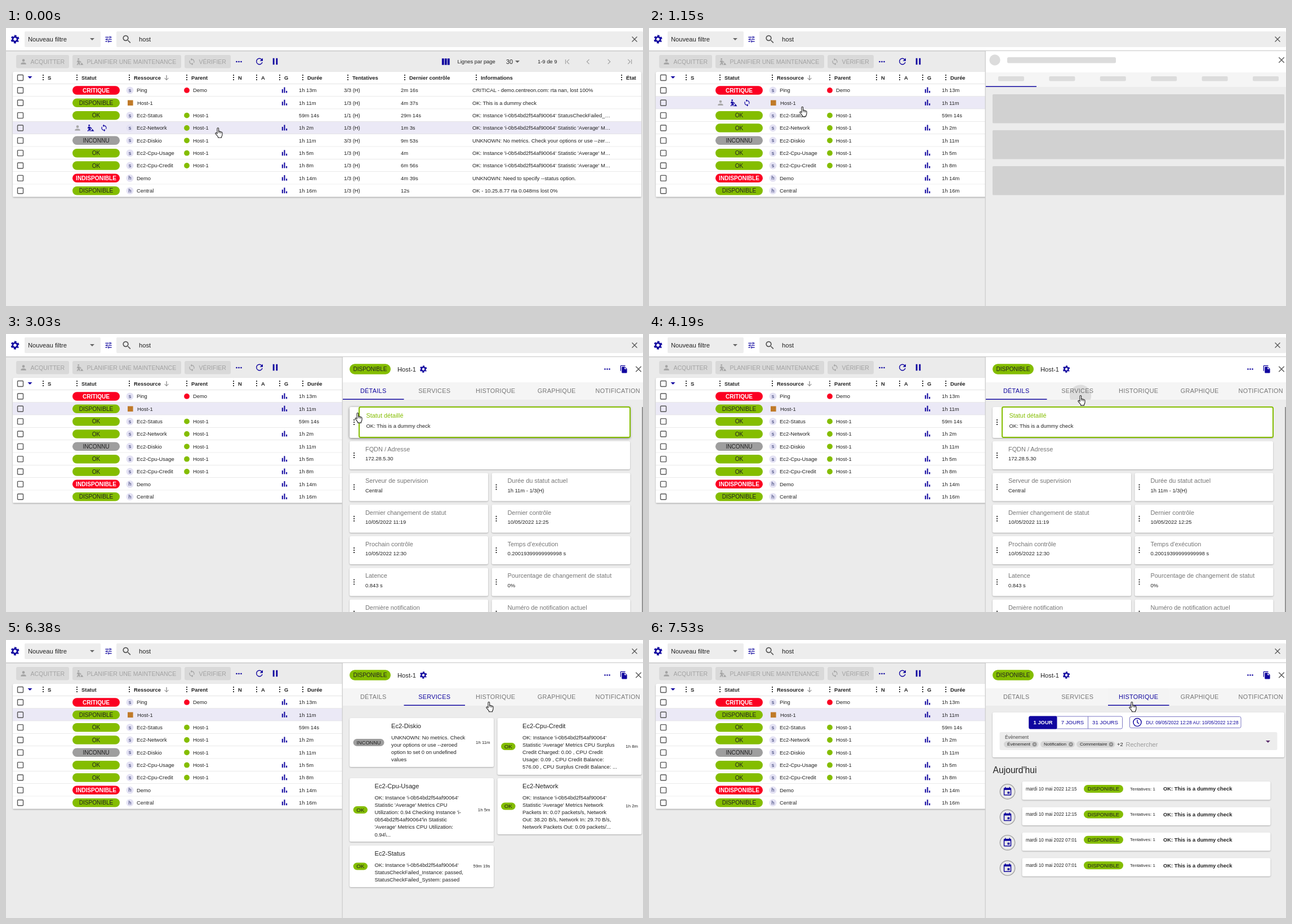
Animation of 1131 by 495 pixels, one loop 8 s. Source, as an HTML page:

```html
<!DOCTYPE html>
<html lang="fr">
<head>
<meta charset="utf-8">
<title>Ressources</title>
<style>
html, body { margin: 0; height: 100%; overflow: hidden; background: #ebebeb; }
svg { display: block; width: 100vw; height: 100vh; }
text { font-family: "Liberation Sans", Arial, sans-serif; white-space: pre; }
.tab { letter-spacing: .3px; }
.card { fill: #fff; filter: drop-shadow(0 1px 1px rgba(0, 0, 0, .28)); }
.card.raised { filter: drop-shadow(0 1px 2px rgba(0, 0, 0, .5)); }
</style>
</head>
<body>
<svg id="stage" viewBox="0 0 1131 495" xmlns="http://www.w3.org/2000/svg"></svg>
<script>
const BLUE = '#10069f', GREEN = '#84bd00', RED = '#fb0022', GREY = '#9e9e9e', INK = '#222', SOFT = '#757575';

// Drawing helpers; text is placed by its vertical centre.
const text = (x, y, s, size = 9.4, fill = INK, more = '') =>
  `<text x="${x}" y="${(y + size * .36).toFixed(2)}" font-size="${size}" fill="${fill}" ${more}>${s}</text>`;
const bold = (x, y, s, size = 9.4, fill = INK, more = '') => text(x, y, s, size, fill, 'font-weight="700" ' + more);
const MID = 'text-anchor="middle"', END = 'text-anchor="end"';
const rect = (x, y, w, h, fill, r = 0, more = '') =>
  `<rect x="${x}" y="${y}" width="${w}" height="${h}" rx="${r}" fill="${fill}" ${more}/>`;
const disc = (x, y, r, fill, more = '') => `<circle cx="${x}" cy="${y}" r="${r}" fill="${fill}" ${more}/>`;
const card = (x, y, w, h, more = '') => `<rect class="card" x="${x}" y="${y}" width="${w}" height="${h}" rx="2.5" ${more}/>`;
const group = (id, body, more = '') => `<g id="${id}" ${more}>${body}</g>`;
const repeat = (n, f) => Array.from({ length: n }, (_, i) => f(i)).join('');
const chip = (x, y, w, h, label, size = 10, fill = GREEN, ink = INK) =>
  rect(x, y - h / 2, w, h, fill, h / 2) +
  text(x + w / 2, y, label, size, ink, MID + (ink === '#fff' ? ' font-weight="700"' : ''));
const grip = (x, y) => repeat(3, i => rect(x - 1, y - 5 + i * 4, 2, 2, INK, .6));
const dots = (x, y) => repeat(3, i => disc(x - 4 + i * 4, y, 1.3, BLUE));
const arrow = (x, y, fill = '#666') => `<path d="M${x - 4} ${y - 2}h8l-4 4z" fill="${fill}"/>`;

// Icons on a 24 x 24 grid
const line = (d, w = 2) => `<path d="${d}" fill="none" stroke="currentColor" stroke-width="${w}"/>`;
const solid = d => `<path d="${d}" fill="currentColor" fill-rule="evenodd"/>`;
const ICONS = {
  gear: `<g fill="none" stroke="currentColor" transform="rotate(30 12 12)"><circle cx="12" cy="12" r="5.5" stroke-width="3.8"/>
    <circle cx="12" cy="12" r="8.4" stroke-width="3.2" stroke-dasharray="4.8 4" stroke-dashoffset="2.4"/></g>`,
  tune: solid('M3 17v2h6v-2zM3 5v2h10V5zm10 16v-2h8v-2h-8v-2h-2v6zM7 9v2H3v2h4v2h2V9zm14 4v-2H11v2zm-6-4h2V7h4V5h-4V3h-2z'),
  search: line('M14.500 14.500L20 20M15 9.500a5.500 5.500 0 1 1-11 0a5.500 5.500 0 1 1 11 0', 2.1),
  close: line('M5.700 5.700L18.300 18.300M18.300 5.700L5.700 18.300', 1.8),
  person: solid('M12 12a4 4 0 1 0 0-8a4 4 0 0 0 0 8zm0 2c-2.700 0-8 1.300-8 4v2h16v-2c0-2.700-5.300-4-8-4z'),
  worker: disc(8, 4, 2.4, 'currentColor') + line('M7 8l-3 5M7 8l2 6l4 3M7 9l1 6l-4 7M9 14l2 8M9 9l7 5', 2.6) + solid('M13 22l5-7l5 7z'),
  sync: solid('M12 4V1L8 5l4 4V6a6 6 0 0 1 5.300 8.800l1.460 1.460A8 8 0 0 0 12 4zm0 14a6 6 0 0 1-5.300-8.800L5.240 7.740A8 8 0 0 0 12 20v3l4-4l-4-4z'),
  refresh: solid('M17.650 6.350A8 8 0 1 0 19.730 14h-2.080A6 6 0 1 1 12 6c1.660 0 3.140.69 4.220 1.780L13 11h7V4z'),
  pause: solid('M6 4h4v16H6zm8 0h4v16h-4z'),
  columns: solid('M2 4h5.500v16H2zm7 0h5.500v16H9zm7 0h5.500v16H16z'),
  bars: solid('M4 9h3.500v11H4zm6.200-6h3.500v17h-3.500zm6.300 11H20v6h-3.500z'),
  copy: solid('M16 1H4a2 2 0 0 0-2 2v14h2V3h12zm-1 4l6 6v10a2 2 0 0 1-2 2H8a2 2 0 0 1-2-2V7a2 2 0 0 1 2-2zm-1 7h5.500L14 6.500z'),
  event: solid('M17 12h-5v5h5zM16 1v2H8V1H6v2H5a2 2 0 0 0-2 2v14a2 2 0 0 0 2 2h14a2 2 0 0 0 2-2V5a2 2 0 0 0-2-2h-1V1zm3 18H5V8h14z'),
  clock: line('M12 6v6.500l4.500 3M22 12a10 10 0 1 1-20 0a10 10 0 1 1 20 0'),
  first: line('M17 5l-7 7l7 7M6 5v14'),
  prev: line('M15 5l-7 7l7 7'),
  next: line('M9 5l7 7l-7 7'),
  last: line('M7 5l7 7l-7 7M18 5v14'),
  down: line('M12 3v17M5 13l7 7l7-7')
};
const icon = (name, x, y, size, color = BLUE) =>
  `<g transform="translate(${x - size / 2} ${y - size / 2}) scale(${size / 24})" color="${color}">${ICONS[name]}</g>`;

const topBar = () =>
  rect(0, 0, 1131, 40, '#fff') + rect(0, 40, 1131, 1, '#c6c6c6') +
  icon('gear', 16, 20, 18) + rect(33, 6, 135, 28, '#ededed', 2) + text(39, 20, 'Nouveau filtre', 11.2) +
  arrow(153, 20) + icon('tune', 182, 20, 15) + rect(196, 6, 935, 28, '#ededed', 2) +
  icon('search', 214.5, 20, 19, '#555') + text(236, 20, 'host', 11.2) + icon('close', 1116, 20, 17, '#555');

const toolButton = (x, w, name, label) =>
  rect(x, 48, w, 23.500, '#d9d9d9', 3) + icon(name, x + 13, 60, 14, '#a3a3a3') + text(x + 25.500, 60, label, 10.5, '#a3a3a3');

const toolbar = () =>
  rect(0, 41, 1131, 1, '#dcdcdc') +
  toolButton(18, 94, 'person', 'ACQUITTER') + toolButton(118, 193, 'worker', 'PLANIFIER UNE MAINTENANCE') +
  toolButton(317, 82, 'sync', 'VÉRIFIER') + dots(413.5, 60) +
  icon('refresh', 450, 59.500, 18) + icon('pause', 478, 59.500, 17) + icon('columns', 781, 60, 17) +
  text(801.5, 60, 'Lignes par page') + text(888, 60, '30', 10.8) + arrow(908, 60) + text(944, 60, '1-9 de 9') +
  ['first', 'prev', 'next', 'last'].map((n, i) => icon(n, 997 + 36.700 * i, 60, 14, '#a0a0a0')).join('');

const ROW_H = 22.34, ROW_TOP = 99.8;
const INSTANCE = "OK: Instance 'i-0b54bd2f54af90064'", AVERAGE = INSTANCE + " Statistic 'Average' M…";
const STATUS = { OK: GREEN, DISPONIBLE: GREEN, INCONNU: GREY, CRITIQUE: RED, INDISPONIBLE: RED };
// status, kind, name, parent, graph, duration, tries, last check, information
const ROWS = [
  ['CRITIQUE', 's', 'Ping', 'Demo', 1, '1h 13m', '3/3 (H)', '2m 16s', 'CRITICAL - demo.centreon.com: rta nan, lost 100%'],
  ['DISPONIBLE', '', 'Host-1', '', 1, '1h 11m', '1/3 (H)', '4m 37s', 'OK: This is a dummy check'],
  ['OK', 's', 'Ec2-Status', 'Host-1', 0, '59m 14s', '1/1 (H)', '29m 14s', INSTANCE + ' StatusCheckFailed_…'],
  ['OK', 's', 'Ec2-Network', 'Host-1', 1, '1h 2m', '1/3 (H)', '1m 3s', AVERAGE],
  ['INCONNU', 's', 'Ec2-Diskio', 'Host-1', 0, '1h 11m', '3/3 (H)', '9m 53s', 'UNKNOWN: No metrics. Check your options or use --zer…'],
  ['OK', 's', 'Ec2-Cpu-Usage', 'Host-1', 1, '1h 5m', '1/3 (H)', '4m', AVERAGE],
  ['OK', 's', 'Ec2-Cpu-Credit', 'Host-1', 1, '1h 8m', '1/3 (H)', '6m 56s', AVERAGE],
  ['INDISPONIBLE', 'h', 'Demo', '', 1, '1h 14m', '1/3 (H)', '4m 39s', 'UNKNOWN: Need to specify --status option.'],
  ['DISPONIBLE', 'h', 'Central', '', 1, '1h 16m', '1/3 (H)', '12s', 'OK - 10.25.8.77 rta 0.048ms lost 0%']
];
const COLUMNS = [[66, 'S'], [126, 'Statut'], [219, 'Ressource'], [321, 'Parent'], [404, 'N'], [445, 'A'], [486, 'G'],
  [527, 'Durée'], [607, 'Tentatives'], [708, 'Dernier contrôle'], [835, 'Informations'], [1093, 'État']];

const checkbox = y => rect(20.500, y - 5, 10, 10, 'none', 1.2, 'stroke="#555" stroke-width="1.4"');

function tableRow([status, kind, name, parent, graph, time, tries, last, info], i) {
  const y = ROW_TOP + ROW_H * (i + .5), color = STATUS[status];
  return rect(12, y - ROW_H / 2, 1116, ROW_H, '#fff', 0, `id="bg${i}"`) +
    rect(12, y + ROW_H / 2 - .8, 1116, .8, '#dedede') + checkbox(y) +
    group('chip' + i, chip(118, y, 84, 15.5, status, 10.1, color, color === RED ? '#fff' : INK)) +
    group('acts' + i, icon('person', 127, y, 14, '#a8a8a8') + icon('worker', 150, y, 14) + icon('sync', 174, y, 14)) +
    (kind ? disc(220, y, 6.5, '#e3e1f3') + text(220, y - .3, kind, 9, '#222a66', MID) : rect(216, y - 4.800, 9.600, 9.600, '#c07a28')) +
    text(kind ? 232 : 233, y, name) +
    (parent ? disc(321, y, 4.9, parent === 'Demo' ? RED : GREEN) + text(332, y, parent) : '') +
    (graph ? icon('bars', 494.5, y - .2, 14) : '') +
    text(520, y, time) + text(600, y, tries) + text(701, y, last) + text(828, y, info);
}

const table = () =>
  card(12, 78, 1116, 223) + checkbox(88.500) + arrow(42.5, 88, BLUE) +
  COLUMNS.map(([x, s]) => grip(x, 88) + bold(x + 8, 88.500, s)).join('') + icon('down', 285, 88.500, 12, '#666') +
  rect(12, 99, 1116, .8, '#d4d4d4') + ROWS.map(tableRow).join('');

const skeleton = () =>
  rect(598, 41, 533, 38, '#fff') + rect(598, 79, 533, 26, '#f5f5f5') + disc(614, 57, 9.7, '#dcdcdc') +
  rect(636, 52, 193, 10.500, '#dcdcdc', 2.5) + icon('close', 1123, 57, 18, '#555') +
  repeat(6, i => rect(620 + 90.400 * i, 86, 46, 8.500, '#dcdcdc', 2)) +
  repeat(3, i => rect(610, 118 + 64 * i, 518, 51.500, '#d1d1d1', 1.5));

const TABS = ['DÉTAILS', 'SERVICES', 'HISTORIQUE', 'GRAPHIQUE', 'NOTIFICATION'];
const TAB_W = 108.5;
const header = () =>
  rect(598, 41, 533, 45, '#fff') + rect(598, 86, 533, 31, '#f5f5f5') +
  chip(610, 62.500, 73, 18.500, 'DISPONIBLE') + text(695, 62.500, 'Host-1', 11.2) + icon('gear', 741, 62.500, 15) +
  dots(1067.5, 62.500) + icon('copy', 1097, 62.500, 15) + icon('close', 1123, 62.500, 18, '#555') +
  TABS.map((s, i) => text(652.2 + TAB_W * i, 101, s, 10.85, SOFT, `${MID} class="tab" id="tab${i}"`)).join('');

const field = (x, y, w, label, value) =>
  card(x, y, w, 50) + grip(x + 8, y + 25) + text(x + 28, y + 14, label, 10.9, SOFT) + text(x + 28, y + 31, value);
const FIELDS = [
  ['Serveur de supervision', 'Central'], ['Durée du statut actuel', '1h 11m - 1/3(H)'],
  ['Dernier changement de statut', '10/05/2022 11:19'], ['Dernier contrôle', '10/05/2022 12:25'],
  ['Prochain contrôle', '10/05/2022 12:30'], ["Temps d'exécution", '0.20019399999999998 s'],
  ['Latence', '0.843 s'], ['Pourcentage de changement de statut', '0%'],
  ['Dernière notification', ''], ['Numéro de notification actuel', '']
];
const details = () =>
  card(610, 130, 498, 55, 'id="statusCard"') + grip(618, 157) +
  rect(627, 130, 481, 54, '#fff', 2.5, `stroke="${GREEN}" stroke-width="2"`) +
  text(639.5, 145, 'Statut détaillé', 10.9, GREEN) + text(639.5, 164, 'OK: This is a dummy check') +
  field(610, 191, 498, 'FQDN / Adresse', '172.28.5.30') +
  FIELDS.map(([a, b], i) => field(i % 2 ? 862.5 : 610, 247.5 + 56.300 * (i >> 1), 246, a, b)).join('') +
  rect(1129, 130, 2, 365, '#949494');

// x, y, height, title, status, duration, lines
const SERVICES = [
  [610, 139, 87, 'Ec2-Diskio', 'INCONNU', '1h 11m',
    ['UNKNOWN: No metrics. Check', 'your options or use --zeroed', 'option to set 0 on undefined', 'values']],
  [872.5, 139, 101, 'Ec2-Cpu-Credit', 'OK', '1h 8m',
    [INSTANCE, "Statistic 'Average' Metrics CPU Surplus", 'Credit Charged: 0.00 , CPU Credit', 'Usage: 0.09 , CPU Credit Balance:', '576.00 , CPU Surplus Credit Balance: ...']],
  [610, 246, 113, 'Ec2-Cpu-Usage', 'OK', '1h 5m',
    [INSTANCE, "Statistic 'Average' Metrics CPU", "Utilization: 0.94 Checking Instance 'i-", "0b54bd2f54af90064'\\n Statistic", "'Average' Metrics CPU Utilization:", '0.94\\...']],
  [872.5, 246, 100, 'Ec2-Network', 'OK', '1h 2m',
    [INSTANCE, "Statistic 'Average' Metrics Network", 'Packets In: 0.07 packets/s, Network', 'Out: 38.20 B/s, Network In: 29.70 B/s,', 'Network Packets Out: 0.09 packets/...']],
  [610, 366, 74, 'Ec2-Status', 'OK', '59m 19s',
    [INSTANCE, 'StatusCheckFailed_Instance: passed,', 'StatusCheckFailed_System: passed']]
];
const services = () => SERVICES.map(([x, y, h, title, status, time, lines]) => {
  const ok = status === 'OK', tx = x + (ok ? 44.500 : 74), cy = y + h / 2;
  return card(x, y, 256, h) + chip(x + 6.500, cy, ok ? 25.500 : 55, 13, status, ok ? 9.7 : 9.2, STATUS[status]) +
    text(tx, y + 14, title, 11.1) + lines.map((s, i) => text(tx, y + 34.300 + 13.200 * i, s)).join('') +
    text(x + 249.500, cy - .5, time, 7.8, INK, END);
}).join('');

const tag = (x, w, s) =>
  rect(x, 180, w, 11.500, '#d6d6d6', 5.7) + text(x + 6, 185.500, s, 8.1) + disc(x + w - 7, 185.700, 3.8, '#8f8f8f') +
  `<path d="M${x + w - 8.5} 184.200l3 3m0-3l-3 3" stroke="#ddd"/>`;
const EDGE = `stroke="#7d78c4" stroke-width="1"`;
const history = () =>
  card(610, 129, 518, 80) + rect(674.5, 136, 166, 22, '#fff', 2.5, EDGE) + rect(674.5, 135.500, 50, 23, BLUE, 2.5) +
  `<path d="M779.5 136v22" ${EDGE}/>` + bold(699.5, 146.500, '1 JOUR', 9.4, '#fff', MID) +
  text(752, 146.500, '7 JOURS', 9.6, BLUE, MID) + text(810, 146.500, '31 JOURS', 9.6, BLUE, MID) +
  rect(853.5, 136.500, 197.500, 20, '#fff', 2.5, EDGE) + icon('clock', 867, 146.500, 17) +
  text(882.5, 146.500, 'DU: 09/05/2022 12:28 AU: 10/05/2022 12:28', 8.32, BLUE) +
  rect(622.5, 164, 493, 32, '#ededed', 2.5) + text(632, 173, 'Évènement', 8.3, '#444') +
  tag(630, 61.500, 'Évènement') + tag(695, 61, 'Notification') + tag(759, 68.500, 'Commentaire') +
  text(831, 186, '+2') + text(846.5, 186, 'Rechercher', 11, '#999') + arrow(1099, 181, '#5d2f6e') +
  text(610.5, 231, "Aujourd'hui", 15.7) +
  ['12:15', '12:15', '07:01', '07:01'].map((hour, i) => {
    const y = 265 + 45.400 * i;
    return disc(636.5, y + 5, 13.2, '#e9e9e9', 'stroke="#a3a3a3" stroke-width="1.4"') + icon('event', 636.5, y + 5, 18) +
      card(662.5, y - 13, 441, 32.500) + text(669, y, 'mardi 10 mai 2022 ' + hour, 8.2) +
      chip(772, y, 70, 14, 'DISPONIBLE', 9.4) + text(854, y - .3, 'Tentatives: 1', 8) + bold(913, y, 'OK: This is a dummy check');
  }).join('');

const HAND = 'M4 11V2a1.300 1.300 0 0 1 2.600 0V7q1.300-.8 2 .4q1.400-.6 2 .6q2-.3 2.400 1.400V12.500q0 2.500-1.500 4.300V18.300H5.600V17Q4 14.500 1 11.300Q.6 9.700 2 9.600Q3 9.700 4 11z';

const stage = document.getElementById('stage');
stage.innerHTML = rect(0, 0, 1131, 495, '#ebebeb') + toolbar() + table() +
  group('panel',
    rect(596.5, 41, 1.500, 454, '#d2d2d2') + rect(598, 41, 533, 454, '#ececec') + group('skeleton', skeleton()) +
    group('content', header() + group('view0', details()) + group('view1', services()) + group('view2', history())) +
    '<clipPath id="tabClip"><rect id="tabBox" y="86" width="108.5" height="31"/></clipPath>' +
    group('ripples', '<circle id="ripple" fill="#333"/>', 'clip-path="url(#tabClip)"') +
    rect(598, 115.500, 109, 1.500, BLUE, 0, 'id="marker"')) +
  topBar() + group('cursor', `<path d="${HAND}" fill="#fff" stroke="#222" stroke-width="1.1"/>` +
    '<path d="M6.600 7v3M8.700 8v2.500M10.700 8.500v2.500" stroke="#222" stroke-width=".8"/>');

const el = {};
stage.querySelectorAll('[id]').forEach(n => el[n.id] = n);
const set = (id, o) => { for (const k in o) el[id].setAttribute(k, o[k]); };
const show = (id, on) => set(id, { display: on ? 'inline' : 'none' });
const clamp = v => Math.min(1, Math.max(0, v));
const part = (t, a, d) => clamp((t - a) / d);
const smooth = p => p * p * (3 - 2 * p);
const easeOut = p => 1 - (1 - p) ** 3;
const mix = (a, b, p) => a + (b - a) * p;

const LOOP = 8000, OPEN = 790, LOADED = 1275;
// Each move: start, end, x, y
const MOVES = [[30, 540, 264, 138], [800, 890, 267, 139.5], [2500, 3310, 752, 140], [3350, 3800, 761, 108.8], [5570, 6380, 852, 109.5]];
// Each tab click: press, switch, content ready
const CLICKS = [[4040, 4240, 4450], [6820, 7020, 7220]];

function pointer(t) {
  let x = 371, y = 177;
  for (const [a, b, tx, ty] of MOVES) {
    const p = smooth(part(t, a, b - a));
    x = mix(x, tx, p);
    y = mix(y, ty, p);
  }
  return [x, y];
}

function draw(t) {
  const [x, y] = pointer(t);
  set('cursor', { transform: `translate(${x} ${y})` });

  const over = x < 594 ? Math.floor((y + 1 - ROW_TOP) / ROW_H) : -1;
  ROWS.forEach((_, i) => {
    set('bg' + i, { fill: i === over || (i === 1 && t >= OPEN) ? '#ebe9f6' : '#fff' });
    show('chip' + i, i !== over);
    show('acts' + i, i === over);
  });

  show('panel', t >= OPEN);
  set('panel', { transform: `translate(${533 * (1 - easeOut(part(t, OPEN, 300)))} 0)` });
  const loaded = t >= LOADED;
  show('skeleton', !loaded);
  show('content', loaded);
  el.statusCard.classList.toggle('raised', x > 606 && y > 128);

  let tab = 0, view = 0, markerX = 598, ripple = 0;
  CLICKS.forEach(([press, swap, ready], i) => {
    if (t >= swap) { tab = i + 1; view = -1; }
    if (t >= ready) view = i + 1;
    markerX += TAB_W * smooth(part(t, swap, 300));
    if (t >= press && t < press + 740) {
      ripple = .12 * (1 - part(t, swap + 40, 480));
      set('tabBox', { x: 598 + TAB_W * (i + 1) });
      set('ripple', { cx: x + 5, cy: y + 1, r: 70 * part(t, press, 550) });
    }
  });
  set('ripple', { 'fill-opacity': ripple });
  TABS.forEach((_, i) => set('tab' + i, { fill: i === tab ? BLUE : SOFT }));
  for (let i = 0; i < 3; i++) show('view' + i, i === view);
  const grow = smooth(part(t, LOADED, 300));
  set('marker', { x: markerX, y: loaded ? 115.5 : 103.5, width: mix(90, 108.5, grow) });
}

const start = performance.now();
function tick() {
  draw((performance.now() - start) % LOOP);
  requestAnimationFrame(tick);
}
tick();
</script>
</body>
</html>
```
